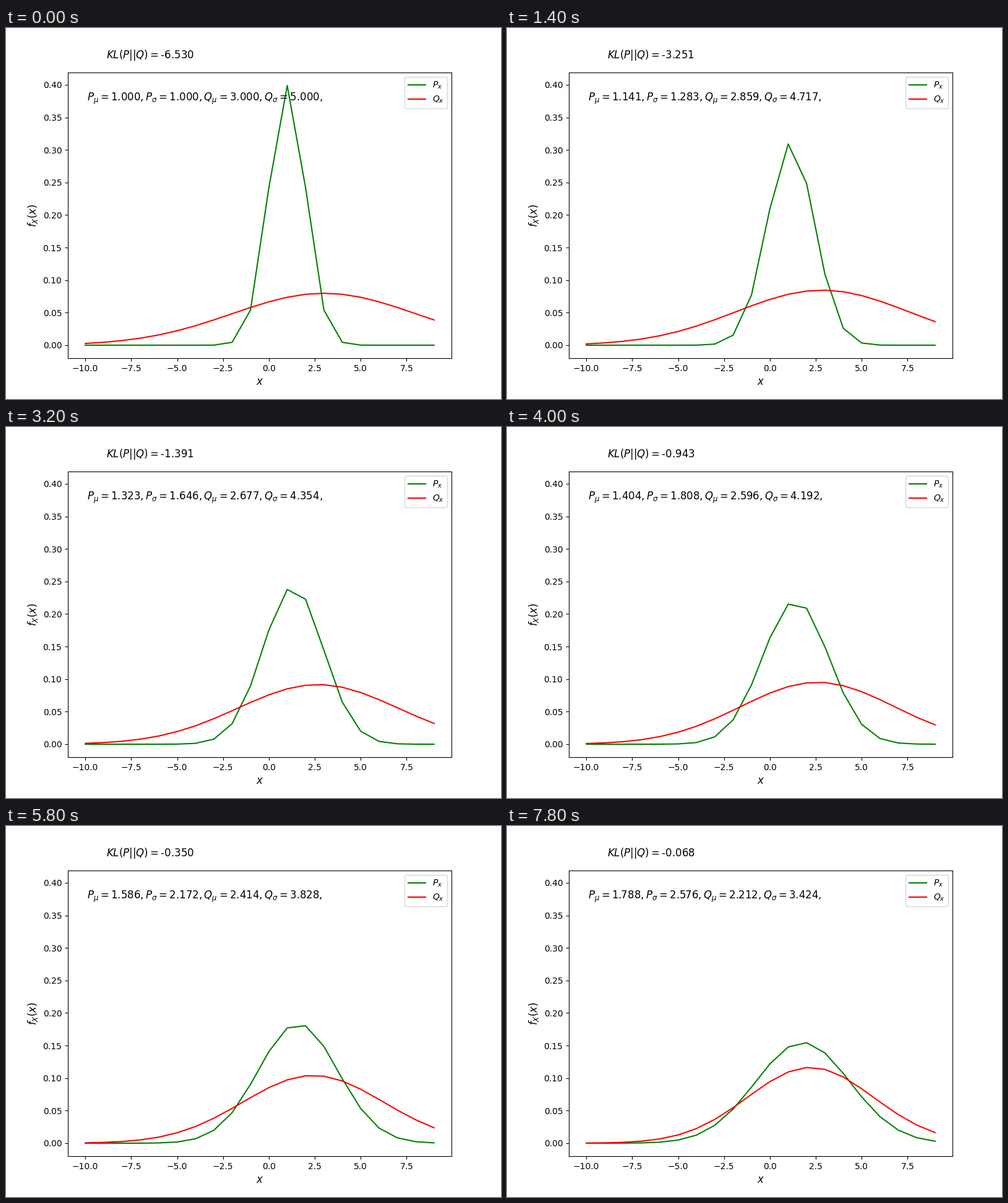
A matplotlib script for the animation above (8 s loop, 800 by 600 pixels).

```python
import numpy as np
import matplotlib.pyplot as plt
from matplotlib.animation import FuncAnimation

FRAMES = 40
INTERVAL = 200
STEPS = 99  # steps for the parameters to swap completely

x = np.arange(-10, 10)


def gauss(mu, sigma):
    return np.exp(-0.5 * ((x - mu) / sigma) ** 2) / (sigma * np.sqrt(2 * np.pi))


def params(frame):
    t = frame / STEPS
    return 1 + 2 * t, 1 + 4 * t, 3 - 2 * t, 5 - 4 * t


fig, ax = plt.subplots(figsize=(8, 6), dpi=100)
p_mu, p_sigma, q_mu, q_sigma = params(0)
p_line, = ax.plot(x, gauss(p_mu, p_sigma), "g", label="$P_x$")
q_line, = ax.plot(x, gauss(q_mu, q_sigma), "r", label="$Q_x$")
ax.set_xlim(ax.get_xlim())
ax.set_ylim(ax.get_ylim())
ax.set_xlabel("$x$", fontsize=12)
ax.set_ylabel("$f_X(x)$", fontsize=12)
ax.legend(loc="upper right")
kl_text = ax.text(0.1, 1.05, "", fontsize=12, transform=ax.transAxes)
param_text = ax.text(0.05, 0.9, "", fontsize=12, transform=ax.transAxes)


def update(frame):
    p_mu, p_sigma, q_mu, q_sigma = params(frame)
    p, q = gauss(p_mu, p_sigma), gauss(q_mu, q_sigma)
    p_line.set_ydata(p)
    q_line.set_ydata(q)
    kl = np.sum(q * np.log(p / q))
    kl_text.set_text(f"$KL(P||Q)=${kl:.3f}")
    param_text.set_text(
        rf"$P_\mu={p_mu:.3f},P_\sigma={p_sigma:.3f},"
        rf"Q_\mu={q_mu:.3f},Q_\sigma={q_sigma:.3f},$"
    )
    return p_line, q_line, kl_text, param_text


anim = FuncAnimation(fig, update, frames=FRAMES, interval=INTERVAL,
                     init_func=lambda: update(0), repeat=True, repeat_delay=0)
plt.show()
```
